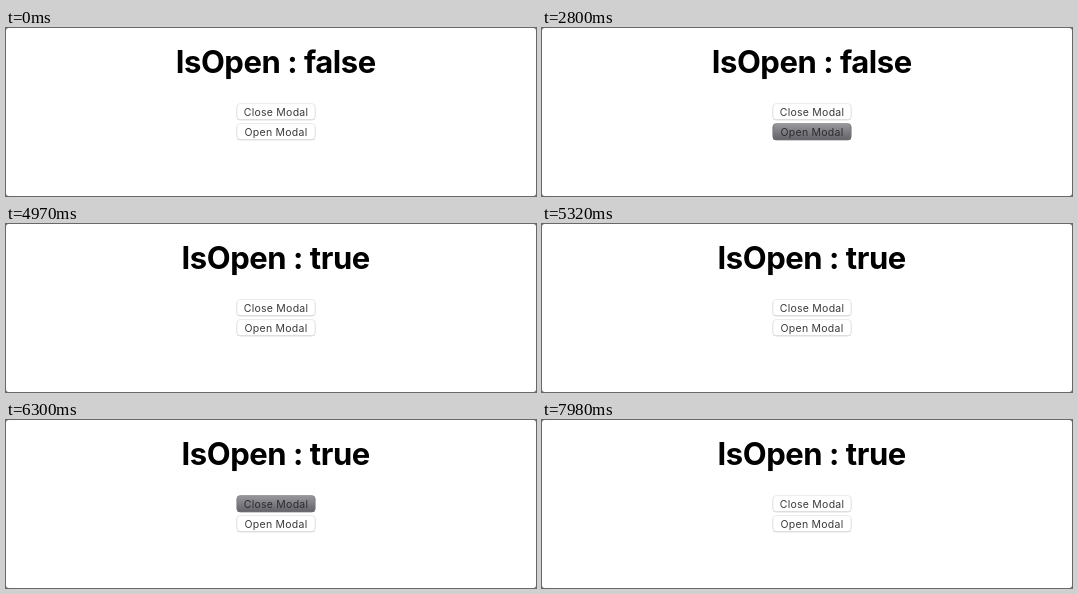
Animation, 530 px wide and 168 px high, one loop 8 s. Source, as an HTML page:

```html
<!DOCTYPE html>
<html lang="en">
<head>
<meta charset="utf-8">
<title>Modal state</title>
<style>
  html, body { margin: 0; width: 530px; height: 168px; overflow: hidden; background: #777; }
  svg { display: block; }
  text { font-family: Inter, sans-serif; text-anchor: middle; }
  #title { font-size: 31px; font-weight: 700; letter-spacing: -0.45px; }
  .button text { font-size: 10.5px; letter-spacing: .25px; fill: #3a3a3a; }
  .face { fill: #fff; stroke: #dcdcdc; stroke-width: .6; }
  .shadow { fill: #c4c4c4; }
  .pressed .face { fill: url(#down); stroke: #77767b; }
  .pressed .shadow { fill: #57565c; }
  .pressed text { fill: #2c2b30; }
</style>
</head>
<body>
<svg width="530" height="168">
  <defs>
    <linearGradient id="down" x2="0" y2="1">
      <stop stop-color="#99989c"/>
      <stop offset="1" stop-color="#646369"/>
    </linearGradient>
  </defs>
  <rect width="530" height="168" rx="3" fill="#fff"/>
  <text id="title" x="269.7" y="45"></text>
  <g id="close" class="button">
    <rect class="shadow" x="230.7" y="76" width="78.6" height="16.2" rx="3.5"/>
    <rect class="face" x="231" y="75.6" width="78" height="16" rx="3.2"/>
    <text x="270" y="88">Close Modal</text>
  </g>
  <g id="open" class="button">
    <rect class="shadow" x="230.7" y="96" width="78.6" height="16.2" rx="3.5"/>
    <rect class="face" x="231" y="95.6" width="78" height="16" rx="3.2"/>
    <text x="270" y="108">Open Modal</text>
  </g>
</svg>
<script>
  const LOOP = 8000;
  // Each pair is the press and release time of one click, in ms.
  const openClicks = [[2800, 2940], [7840, 7980]];
  const closeClicks = [
    [4060, 4130], [4900, 4970], [5040, 5110], [5180, 5320], [5390, 5460], [5530, 5600],
    [5740, 5810], [5880, 6020], [6300, 6370], [6440, 6580], [7000, 7140]
  ];
  const byId = id => document.getElementById(id);
  const isDown = (clicks, t) => clicks.some(([press, release]) => t >= press && t < release);

  const start = performance.now();
  function draw() {
    const t = (performance.now() - start) % LOOP;
    byId('title').textContent = `IsOpen : ${t >= openClicks[0][1]}`;
    byId('open').classList.toggle('pressed', isDown(openClicks, t));
    byId('close').classList.toggle('pressed', isDown(closeClicks, t));
    requestAnimationFrame(draw);
  }
  draw();
</script>
</body>
</html>
```
